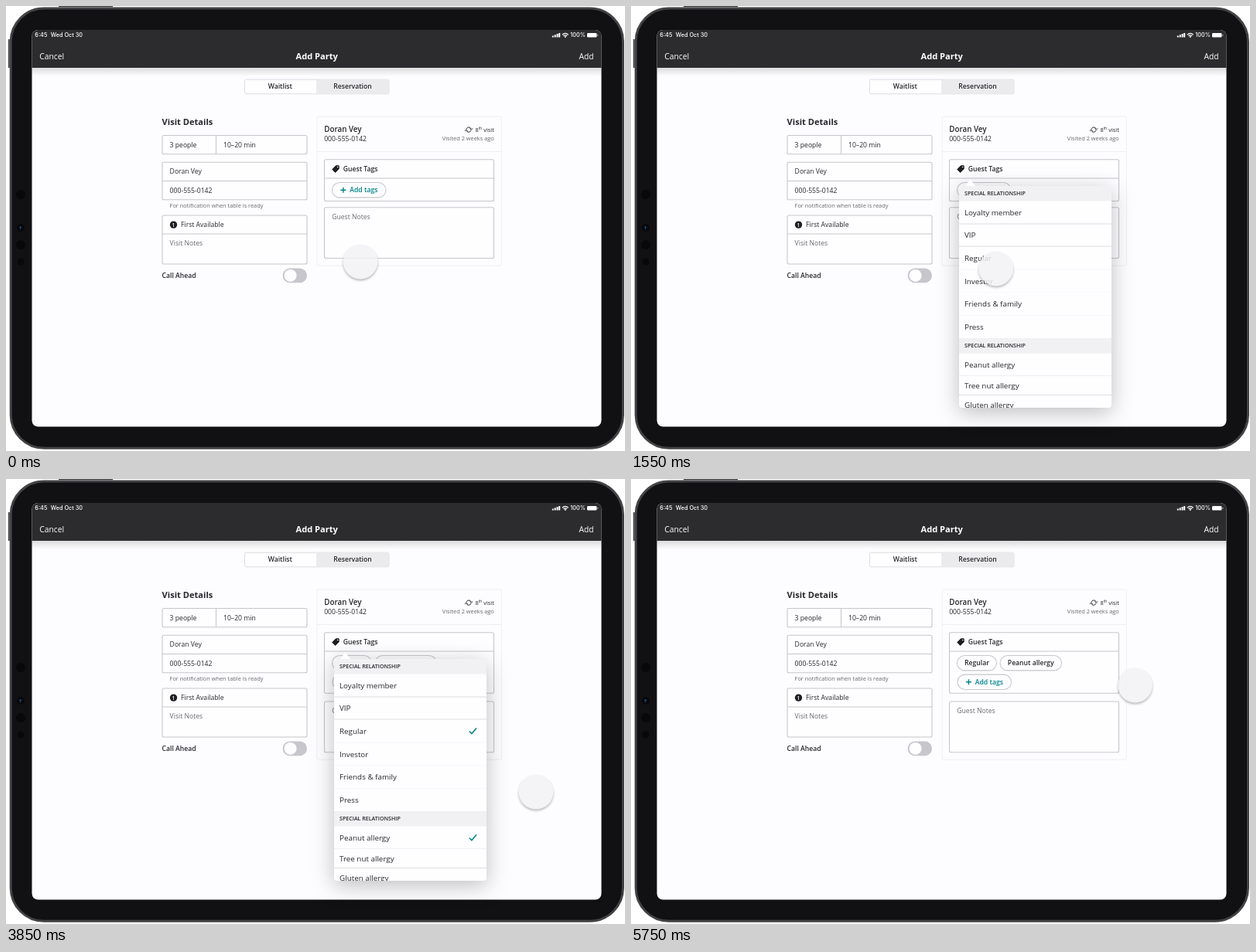
An HTML page for the animation above (6 s loop, 800 by 576 pixels).

```html
<!DOCTYPE html>
<html lang="en">
<head>
<meta charset="utf-8">
<title>Add Party</title>
<style>
  html, body { margin: 0; width: 100%; height: 100%; overflow: hidden; background: #fff; }
  svg { display: block; width: 800px; height: 576px; }
  text { font: 400 8.65px "Open Sans", "Noto Sans", sans-serif; fill: #28272c; white-space: pre; }
  .semi { font-weight: 600; }
  .bold { font-size: 11.1px; font-weight: 700; }
  .row { font-size: 9.84px; }
  .small { font-size: 7.4px; fill: #68676d; }
  .hint { fill: #6b6a70; }
  .nav { font-size: 10.3px; fill: #fff; }
  .status { font: 500 7.3px Inter, Roboto, sans-serif; fill: #fff; }
  .head { font-size: 7.1px; font-weight: 600; }
  .mid { text-anchor: middle; }
  .end { text-anchor: end; }
  .box { fill: #fefdff; stroke: #c7c6cb; stroke-width: 1.1; }
  .rule { fill: none; stroke: #c7c6cb; stroke-width: 1.1; }
  .faint { fill: none; stroke: #efeef1; }
  .teal { fill: #00828a; }
  .check { fill: none; stroke: #00828a; stroke-width: 1.5; }
  #pop { filter: drop-shadow(0 6px 14px rgba(0, 0, 0, .25)); }
  #dot { fill: #f3f2f4; }
</style>
</head>
<body>
<svg viewBox="0 0 800 576" xmlns="http://www.w3.org/2000/svg">
  <defs>
    <linearGradient id="fade" x2="0" y2="1">
      <stop offset="0" stop-color="#000" stop-opacity=".13"/>
      <stop offset="1" stop-color="#000" stop-opacity="0"/>
    </linearGradient>
    <clipPath id="screen"><rect x="33.5" y="31" width="736" height="513.5" rx="8"/></clipPath>
    <clipPath id="list"><rect x="424" y="233" width="197" height="287" rx="4"/></clipPath>
  </defs>

  <!-- tablet -->
  <path d="M68 .6H138" stroke="#3a3a3d" stroke-width="1.4"/>
  <path d="M3.8 43V80" stroke="#47474a" stroke-width="2"/>
  <rect x="6.2" y="3" width="791.3" height="569.3" rx="43" fill="#111012" stroke="#434346" stroke-width="3"/>
  <g fill="#08080a">
    <circle cx="19" cy="244" r="6"/>
    <circle cx="19" cy="287" r="5"/>
    <circle cx="19" cy="309" r="6"/>
    <circle cx="19" cy="331" r="4.5"/>
  </g>
  <path d="M18.5 285V289.5M17 286.3H20.5" stroke="#174a78"/>

  <g clip-path="url(#screen)">
    <rect x="33" y="31" width="737" height="514" fill="#fdfcfe"/>
    <rect x="33" y="80" width="737" height="11" fill="url(#fade)"/>
    <rect x="33" y="31" width="737" height="49" fill="#2c2b2d"/>
  </g>

  <!-- status and navigation -->
  <text class="status" x="37.3" y="40.3">6:45</text>
  <text class="status" x="57.8" y="40.3">Wed Oct 30</text>
  <text class="status end" x="749" y="40.3">100%</text>
  <path d="M706.8 40.5v-2M709.7 40.5v-3.2M712.6 40.5v-4.4M715.2 40.5v-5.6" stroke="#fff" stroke-width="2"/>
  <g fill="none" stroke="#fff" stroke-width="1.2">
    <path d="M718.9 37.2Q722.8 33.6 726.7 37.2M720.4 38.9Q722.8 36.8 725.2 38.9"/>
  </g>
  <circle cx="722.8" cy="40.1" r="1" fill="#fff"/>
  <rect x="751" y="35" width="12.5" height="5.6" rx="1.4" fill="#fff"/>
  <rect x="764.3" y="36.7" width="1" height="2.2" fill="#aaa"/>
  <text class="nav" x="43.2" y="69.4">Cancel</text>
  <text class="nav end" x="759.7" y="69.4">Add</text>
  <text class="bold mid" x="401.7" y="69.3" style="fill:#fff">Add Party</text>

  <!-- segmented control -->
  <rect x="308.5" y="95.2" width="186.5" height="18.6" rx="2" fill="#fefdff" stroke="#dddce0"/>
  <path d="M401 95.2H493a2 2 0 0 1 2 2V111.8a2 2 0 0 1-2 2H401z" fill="#ebeaec"/>
  <text class="semi mid" x="354.3" y="107.4">Waitlist</text>
  <text class="semi mid" x="448" y="107.4">Reservation</text>

  <!-- visit details -->
  <text class="bold" x="201.6" y="154.4">Visit Details</text>
  <rect class="box" x="202" y="167.5" width="187" height="24.3" rx="2"/>
  <path class="rule" d="M271.5 167.5V191.8"/>
  <text x="211.6" y="182.9">3 people</text>
  <text x="281" y="182.9">10–20 min</text>
  <rect class="box" x="202" y="202.2" width="187" height="48.6" rx="2"/>
  <path class="rule" d="M202 226.5H389"/>
  <text x="211.6" y="217.3">Doran Vey</text>
  <text x="211.6" y="241.8">000-555-0142</text>
  <text class="small" x="211.6" y="260.9">For notification when table is ready</text>
  <rect class="box" x="202" y="271" width="187" height="63" rx="2"/>
  <path class="rule" d="M202 295H389"/>
  <circle cx="216.5" cy="283.1" r="4.7" fill="#1f1e23"/>
  <text class="semi mid" x="216.5" y="285.6" style="font-size:6.6px;fill:#fff">1</text>
  <text x="226" y="286.1">First Available</text>
  <text class="hint" x="211.6" y="310.3">Visit Notes</text>
  <text class="semi" x="201.6" y="352.1">Call Ahead</text>
  <rect x="357.6" y="339.5" width="31.4" height="18.8" rx="9.4" fill="#c7c6cc"/>
  <circle cx="367.6" cy="348.9" r="8" fill="#fefdff"/>

  <!-- guest card -->
  <rect id="card" class="faint" x="402" y="143" width="238.3" height="193" rx="2"/>
  <path class="faint" d="M402 188.5H640"/>
  <text class="row semi" x="411.2" y="163.3">Doran Vey</text>
  <text x="411.2" y="175.2">000-555-0142</text>
  <g fill="none" stroke="#333237">
    <path d="M595 159.2A3.3 3.3 0 0 1 601.2 159M601 161A3.3 3.3 0 0 1 594.8 161.2"/>
    <path d="M599.4 158.6L601.4 160.4L603 158.4M593 161.8L594.7 159.8L596.6 161.6"/>
  </g>
  <text class="end" x="630.8" y="162.8" style="font-size:7.4px;font-weight:500">8<tspan dy="-2.8" style="font-size:4.8px">th</tspan><tspan dy="2.8"> visit</tspan></text>
  <text class="small end" x="630.8" y="174">Visited 2 weeks ago</text>
  <rect id="tags" class="box" x="411.5" y="198.7" width="219" height="53.8" rx="2"/>
  <path class="rule" d="M411.5 223H630.5"/>
  <path d="M421.8 211.5L426.3 206.8H430.2V210.8L425.6 215.4Z" fill="#1f1e23" stroke="#1f1e23" stroke-width="1" stroke-linejoin="round"/>
  <circle cx="428.7" cy="208.5" r=".8" fill="#fff"/>
  <text class="semi" x="435.8" y="214.1">Guest Tags</text>
  <g id="regular">
    <rect class="box" x="421.5" y="228.5" width="51" height="19.4" rx="9.7"/>
    <text class="semi mid" x="447" y="241.3">Regular</text>
  </g>
  <g id="peanut">
    <rect class="box" x="477" y="228.5" width="79.5" height="19.4" rx="9.7"/>
    <text class="semi mid" x="516.7" y="241.3">Peanut allergy</text>
  </g>
  <g id="add">
    <rect class="box" x="421.5" y="228.5" width="69.5" height="19.4" rx="9.7"/>
    <path d="M432.4 238.2H439.4M435.9 234.7V241.7" stroke="#00828a" stroke-width="1.4"/>
    <text class="semi teal" x="444.3" y="241.3">Add tags</text>
  </g>
  <g id="notes">
    <rect class="box" x="411.5" y="260.7" width="219" height="65.8" rx="2"/>
    <text class="hint" x="421.2" y="275.7">Guest Notes</text>
  </g>

  <!-- tag list -->
  <g id="pop">
    <path d="M431 234L438.5 224.5L446 234Z" fill="#fefdff"/>
    <rect x="424" y="233" width="197" height="287" rx="4" fill="#fefdff"/>
    <g id="rows" clip-path="url(#list)"></g>
    <path id="tick1" class="check" d="M598.7 326.5L601.9 329.6L608 322.6"/>
    <path id="tick2" class="check" d="M598.7 464.5L601.9 467.6L608 460.6"/>
  </g>

  <circle id="dot" r="22.4"/>
</svg>
<script>
  const $ = id => document.getElementById(id);
  const LOOP = 6000, STEP = 50;

  const header = y => `<rect x="424" y="${y}" width="197" height="19.5" fill="#f1f0f2"/>
    <text class="head" x="431" y="${y + 12.4}">SPECIAL RELATIONSHIP</text>`;
  const row = ([name, y, line, color]) => `<text class="row" x="431" y="${y + 3.6}">${name}</text>` +
    (line ? `<path d="M424 ${line}H621" stroke="${color}"/>` : "");

  $("rows").innerHTML = header(233) + header(430) + [
    ["Loyalty member", 267.3, 282, "#dddce0"],
    ["VIP", 296.8, 311, "#dddce0"],
    ["Regular", 326.4, 341, "#f8f7f9"],
    ["Investor", 356, 370.5, "#f8f7f9"],
    ["Friends &amp; family", 385.6, 400.5, "#f8f7f9"],
    ["Press", 415.1, 0],
    ["Peanut allergy", 464.4, 478.5, "#f0eff2"],
    ["Tree nut allergy", 491.4, 503.5, "#dddce0"],
    ["Gluten allergy", 516, 0]
  ].map(row).join("");

  const sine = p => (1 - Math.cos(Math.PI * p)) / 2;
  const easeIn = p => p * p;

  // start time, end time, from, bend, to, easing
  const moves = [
    [0, 500, [458, 331], [452.5, 288], [457.5, 245], sine],
    [1000, 1600, [457.5, 245], [593, 268], [467.5, 342.5], sine],
    [2100, 2750, [467.5, 344], [678, 372], [514, 467], sine],
    [3300, 3700, [514, 467], [610, 455], [685, 410], sine],
    [3800, 3950, [685, 410], [685, 400], [685, 391], sine],
    [4850, 5500, [685, 391], [620, 320], [651, 221], sine],
    [5550, 5750, [651, 221], [651.5, 244], [651.5, 267], easeIn]
  ];
  const presses = [650, 1850, 3000];

  function place(t) {
    const [a, b, from, bend, to, ease] = moves.filter(m => t >= m[0]).pop();
    const u = ease(Math.min(1, (t - a) / (b - a))), v = 1 - u;
    return from.map((f, i) => v * v * f + 2 * u * v * bend[i] + u * u * to[i]);
  }

  const show = (id, on) => $(id).style.display = on ? "" : "none";
  const shift = (id, x, y) => $(id).setAttribute("transform", `translate(${x} ${y})`);

  function draw(time) {
    const t = Math.floor(time % LOOP / STEP) * STEP;
    const one = t >= 1900, two = t >= 3050;

    show("regular", one);
    show("peanut", two);
    show("tick1", one);
    show("tick2", two);
    show("pop", t >= 700 && t < 3900);

    shift("add", two ? .5 : one ? 55.5 : 0, two ? 24.6 : 0);
    shift("notes", 0, two ? 27.3 : 0);
    $("tags").setAttribute("height", two ? 78.6 : 53.8);
    $("card").setAttribute("height", two ? 220.2 : 193);

    const pressed = presses.includes(t), dot = $("dot");
    shift("dot", ...place(t));
    dot.style.opacity = pressed ? .4 : .83;
    dot.style.filter = pressed ? "none" : "drop-shadow(0 2px 1.6px rgba(0,0,0,.32))";
  }

  const start = performance.now();
  function tick() {
    draw(performance.now() - start);
    requestAnimationFrame(tick);
  }
  draw(0);
  requestAnimationFrame(tick);
</script>
</body>
</html>
```
